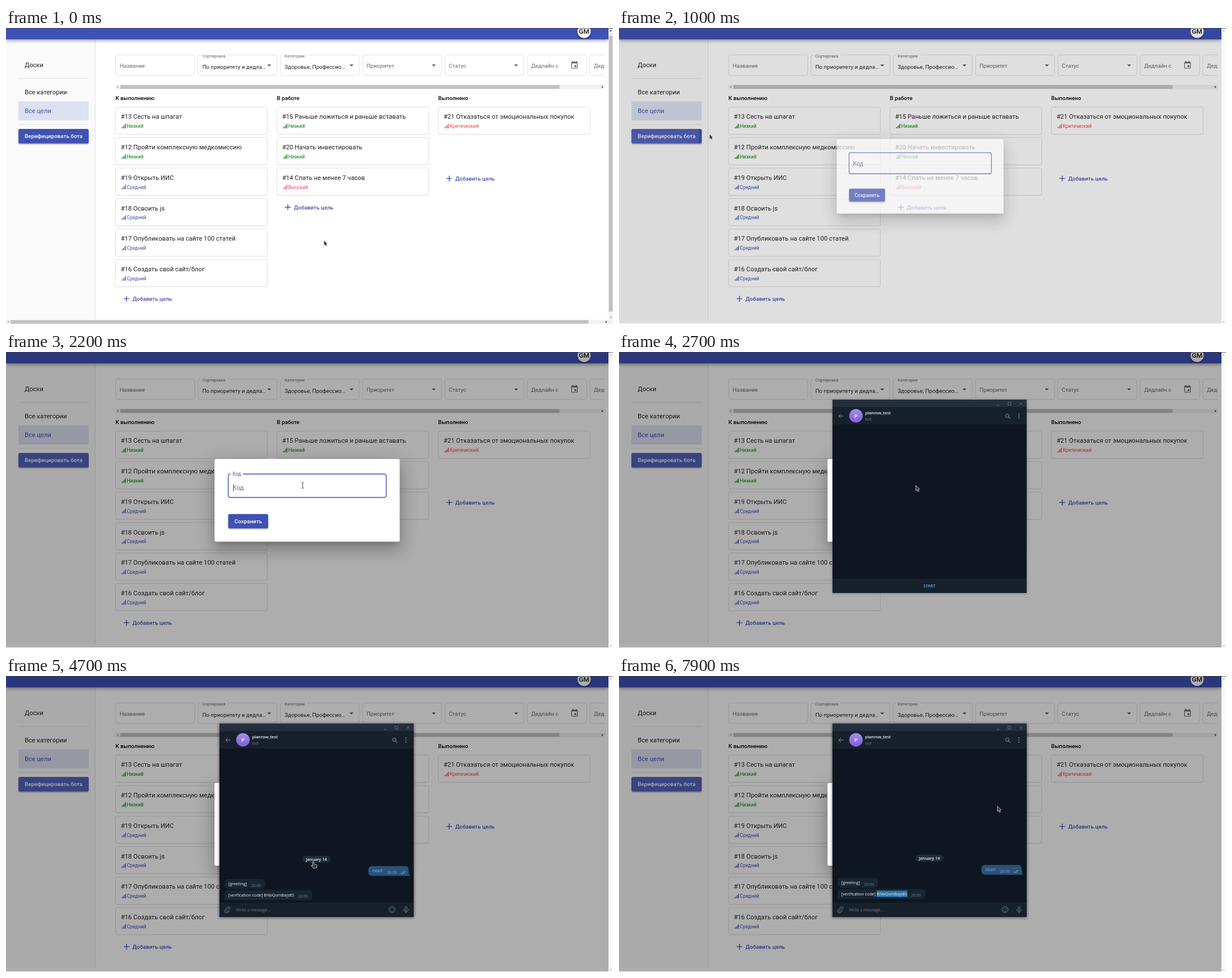
An HTML page for the animation above (8000 ms loop, 1072 px wide and 522 px high).

```html
<!DOCTYPE html>
<html lang="ru">
<head>
<meta charset="utf-8">
<title>Доска целей</title>
<style>
html, body { margin: 0; width: 100%; height: 100%; overflow: hidden; background: #fff; }
svg { display: block; width: 100vw; height: 100vh; }
text { font-family: Roboto, Arial, sans-serif; font-size: 9.77px; fill: #212121; white-space: pre; }
.md { font-weight: 500; }
.nav, .title { font-size: 11.17px; }
.tag { font-size: 8.38px; }
.hint { fill: #666; }
.small { font-size: 7.33px; fill: #666; }
.user { font-size: 11.8px; text-anchor: middle; }
.mid { text-anchor: middle; }
.chat text { font-family: "Open Sans", "Noto Sans", sans-serif; font-size: 7.26px; fill: #f0f3f6; }
.chat .semi { font-weight: 600; }
.chat .time { font-size: 6.7px; }
.chat .initial { font-size: 9px; text-anchor: middle; }
</style>
</head>
<body>
<svg id="stage" viewBox="0 0 1072 522" preserveAspectRatio="none"></svg>
<script>
const LOOP = 8000, STEP = 100;
const BLUE = '#3f51b5', GREEN = '#008000', PINK = '#ec407a', RED = '#f44336', LINE = '#e0e0e0';
const LEVELS = { low: ['Низкий', GREEN], mid: ['Средний', BLUE], high: ['Высокий', PINK], top: ['Критический', RED] };

const rect = (x, y, w, h, fill, more = '') =>
  `<rect x="${x}" y="${y}" width="${w}" height="${h}" fill="${fill}" ${more}/>`;
const text = (x, y, str, cls = '', fill = '', more = '') =>
  `<text x="${x}" y="${y}" class="${cls}" ${fill && `style="fill:${fill}"`} ${more}>${str}</text>`;
const path = (d, color, width = 1, more = '') =>
  `<path d="${d}" fill="none" stroke="${color}" stroke-width="${width}" ${more}/>`;
const solid = (d, fill, more = '') => `<path d="${d}" fill="${fill}" ${more}/>`;
const circle = (x, y, r, fill, more = '') => `<circle cx="${x}" cy="${y}" r="${r}" fill="${fill}" ${more}/>`;
const group = (id, body, more = '') => `<g id="${id}" ${more}>${body}</g>`;
const shadow = (x, y, w, h, dy, blur, spread, alpha) =>
  rect(x - spread, y - spread + dy, w + 2 * spread, h + 2 * spread, '#000',
    `rx="3" opacity="${alpha}" style="filter:blur(${blur / 2}px)"`);
const arrowHead = (x, y, dx, dy, fill) =>
  solid(`M${x + dx * 2} ${y + dy * 2}L${x - dx - dy * 2} ${y - dy - dx * 2}L${x - dx + dy * 2} ${y - dy + dx * 2}Z`, fill);

function card(x, y, title, level) {
  const [name, color] = LEVELS[level];
  const bars = [2.2, 4, 6, 8].map((h, i) => rect(x + 11 + i * 2.1, y + 37.4 - h, 1.15, h, color)).join('');
  return shadow(x, y, 268, 48, .7, 1.4, 0, .1) + rect(x, y, 268, 48, '#fff', `rx="3" stroke="${LINE}"`) +
    text(x + 9.2, y + 20.8, title, 'title') + bars + text(x + 20, y + 36.5, name, 'tag', color);
}

function column(x, name, cards, addY) {
  return text(x - .2, 126.8, name, 'md', '#000') +
    cards.map(([title, level], i) => card(x, 139.5 + i * 53.75, title, level)).join('') +
    path(`M${x + 14.2} ${addY}h10M${x + 19.2} ${addY - 5}v10`, BLUE, 1.4) +
    text(x + 30, addY + 3.6, 'Добавить цель', 'md', BLUE);
}

function field(i, label, { value, w = 139.5, arrow = true } = {}) {
  const x = 193.7 + i * 145.35;
  let out = rect(x, 47.5, w, 36, '#fff', `rx="3.5" stroke="${LINE}"`);
  if (value) {
    out += rect(x + 5, 46.5, label.length * 4.1 + 6, 2, '#fff') +
      text(x + 7.6, 51.6, label, 'small') + text(x + 7.6, 71.6, value);
  } else out += text(x + 7, 69.6, label, 'hint');
  if (arrow) out += solid(`M${x + 122.3} 64.3h7l-3.5 3.6z`, '#666');
  return out;
}

function page() {
  const calendar = rect(998.9, 60.2, 10.2, 10.8, 'none', 'rx="1" stroke="#666" stroke-width="1.2"') +
    rect(998.9, 60.2, 10.2, 2.2, '#666') + path('M1001 58v3M1007 58v3', '#666', 1.2) + rect(1004, 65.6, 3.2, 3.2, '#666');
  return rect(0, 0, 1072, 522, '#fff') + rect(0, 20, 157.5, 494.5, '#fafafa') + path('M157.5 20V514.5', LINE) +
    text(33, 69, 'Доски', 'nav') + text(33, 117, 'Все категории', 'nav') +
    path('M22 89H146M22 170.3H146', LINE) +
    rect(22, 129.5, 124, 33.5, '#dde0f0') + text(33, 150.4, 'Все цели', 'nav', BLUE) +
    shadow(22, 178, 124, 25.5, 1.6, 2.6, 0, .35) + rect(22, 178, 124, 25.5, BLUE, 'rx="2.8"') +
    `<clipPath id="btn"><rect x="22" y="178" width="124" height="25.5" rx="2.8"/></clipPath>` +
    circle(60, 190, 0, '#fff', 'id="ripple" clip-path="url(#btn)" opacity=".1"') +
    text(33, 194, 'Верифицировать бота', 'md', '#fff') +
    `<clipPath id="bar"><rect x="158" y="40" width="899" height="50"/></clipPath><g clip-path="url(#bar)">` +
    field(0, 'Название', { arrow: false }) +
    field(1, 'Сортировка', { value: 'По приоритету и дедла…' }) +
    field(2, 'Категории', { value: 'Здоровье, Профессио…' }) +
    field(3, 'Приоритет') + field(4, 'Статус') +
    field(5, 'Дедлайн с', { w: 105, arrow: false }) + calendar +
    field(5.762, 'Дедлайн по', { w: 105, arrow: false }) + '</g>' +
    rect(193.5, 100, 863.5, 8, '#f1f1f1') + rect(202, 100.7, 775.5, 6.6, '#c1c1c1') +
    arrowHead(197.5, 104, -1, 0, '#a3a3a3') + arrowHead(1053, 104, 1, 0, '#505050') +
    column(193.5, 'К выполнению', [['#13 Сесть на шпагат', 'low'], ['#12 Пройти комплексную медкомиссию', 'low'],
      ['#19 Открыть ИИС', 'mid'], ['#18 Освоить js', 'mid'],
      ['#17 Опубликовать на сайте 100 статей', 'mid'], ['#16 Создать свой сайт/блог', 'mid']], 477.4) +
    column(478.5, 'В работе', [['#15 Раньше ложиться и раньше вставать', 'low'],
      ['#20 Начать инвестировать', 'low'], ['#14 Спать не менее 7 часов', 'high']], 316) +
    column(763.5, 'Выполнено', [['#21 Отказаться от эмоциональных покупок', 'top']], 265.4) +
    shadow(0, 0, 1064, 20, 2, 6, 0, .4) + rect(0, 0, 1064, 20, BLUE) +
    shadow(1011, 0, 20, 16, 2, 4, 0, .3) + circle(1021, 6, 11.6, '#fff') +
    text(1021, 10.4, 'GM', 'user md', '#111');
}

function pageBars() {
  return rect(1064, 0, 8, 522, '#f1f1f1') + rect(0, 514.5, 1072, 7.5, '#f1f1f1') +
    rect(1064.7, 14, 6.6, 486, '#c1c1c1') + rect(8, 515.2, 1020.5, 6.2, '#c1c1c1') +
    arrowHead(1068, 5, 0, -1, '#505050') + arrowHead(1068, 510, 0, 1, '#a3a3a3') +
    arrowHead(4, 518.3, -1, 0, '#a3a3a3') + arrowHead(1060, 518.3, 1, 0, '#505050');
}

function dialog() {
  const [x, y, w, h] = [368.3, 188.5, 327, 146];
  return shadow(x, y, w, h, 7.7, 10.5, -4.9, .2) + shadow(x, y, w, h, 16.8, 26.6, 2, .14) +
    shadow(x, y, w, h, 6.3, 32, 5.6, .12) + rect(x, y, w, h, '#fff', 'rx="2.8"') +
    rect(392.5, 215.3, 279, 41.2, '#fff', `id="box" rx="3.5" stroke="${LINE}"`) +
    rect(396.5, 214, 22, 2.8, '#fff', 'id="notch"') +
    text(400.2, 243.2, 'Код', 'nav hint', '', 'id="ghost"') +
    group('label', text(0, 0, 'Код', 'nav', 'inherit')) +
    rect(401, 233, 1, 13, BLUE, 'id="caret"') +
    shadow(392.5, 285.7, 70.5, 25.3, 1.6, 2.6, 0, .35) + rect(392.5, 285.7, 70.5, 25.3, BLUE, 'rx="2.8"') +
    text(403.4, 301.8, 'Сохранить', 'md', '#fff');
}

function bubble(x, y, w, fill, body) {
  return rect(x, y, w, 17.4, fill, 'rx="6"') + body;
}

function chat() {
  const grey = '#6d7f8f', inFill = '#182533';
  return group('glow', shadow(377, 84, 343, 341, .5, 4, 1, .45)) +
    rect(377, 84, 343, 341, '#0e1621', 'rx="1.5"') + rect(377, 84, 343, 13.5, '#242f3d', 'rx="1.5"') +
    rect(377, 97.3, 343, 30.5, '#17212b') +
    path('M667 94h5M687 88.6h5v5h-5zM707.5 88.6l5 5M712.5 88.6l-5 5', grey, .8) +
    path('M396.3 113h-8.2m3.7-3.8l-3.8 3.8 3.8 3.8', '#8a98a5', 1) +
    `<linearGradient id="dot" x2="0" y2="1"><stop stop-color="#a98eea"/><stop offset="1" stop-color="#7b5fdc"/></linearGradient>` +
    circle(418.5, 112.6, 11.9, 'url(#dot)') +
    text(418.5, 115.9, 'P', 'semi initial', '#fff') +
    text(434.8, 110, 'planrow_test', 'semi') + text(434.8, 121.2, 'bot', '', grey) +
    circle(685.7, 112.2, 3, 'none', `stroke="${grey}" stroke-width="1.1"`) + path('M688 114.5l3.2 3.2', grey, 1.2) +
    [109.2, 112.9, 116.6].map(y => circle(706.3, y, .95, '#8a98a5')).join('') +
    `<clipPath id="view"><rect x="377" y="128" width="343" height="271.7"/></clipPath><g clip-path="url(#view)"><g id="feed">` +
    rect(523.2, 315, 50, 12.3, '#1e2c3a', 'rx="6.1"') + text(548.2, 323.8, 'January 14', 'semi mid') +
    bubble(640, 333.2, 71, '#2b5278', solid('M703 340h8q0 8 3 10.6h-9z', '#2b5278') +
      text(646.6, 344.4, '/start', '', '#7cbdf3') + text(672.8, 347, '20:09', 'time', '#7da8d3') +
      path('M697 345l2 2.1 4-5M700.7 346.4l.7.7 4.2-5', '#72bcf5', .9)) +
    group('greet', bubble(386, 356, 71.5, inFill, text(392.8, 367.2, '[greeting]') + text(433, 369.8, '20:09', 'time', grey))) +
    group('code', bubble(386, 375.6, 155, inFill, solid('M386 384q0 7-2.6 9h8z', inFill) +
      rect(455, 378.4, 54.3, 11.6, '#2e70a5', 'id="pick"') +
      text(392.8, 386.8, '[verification code]') + text(455.2, 386.8, 'BNbQomBajs8S') +
      text(516, 389.4, '20:09', 'time', grey))) + '</g></g>' +
    rect(377, 399.7, 343, 25.3, '#17212b') +
    group('startBar', text(548.2, 414.6, 'START', 'semi mid', '#5ea9e6')) +
    group('inputBar', path('M393.5 408.6l-5 5a1.5 1.5 0 0 0 2.1 2.1l4.3-4.4a2.6 2.6 0 0 0-3.7-3.7l-4.6 4.7a3.6 3.6 0 0 0 5 5l3.3-3.3', grey, .95) +
      text(406, 414.6, 'Write a message...', '', grey) +
      circle(681.8, 412, 5.3, 'none', `stroke="${grey}" stroke-width="1"`) +
      circle(679.9, 410.5, .8, grey) + circle(683.7, 410.5, .8, grey) + path('M679 413.6q2.8 3.2 5.6 0', grey, .9) +
      rect(704.9, 406.6, 3.2, 7, 'none', `rx="1.6" stroke="${grey}" stroke-width="1"`) +
      path('M702.3 411.5a4.2 4.2 0 0 0 8.4 0M706.5 415.8v2.4', grey, 1));
}

function pointers() {
  const edge = 'stroke="#e8e8e8" stroke-width=".8" stroke-linejoin="round"';
  const beam = 'M-2-5.2h1.4L0-4.6.6-5.2H2M0-4.6V4.6M-2 5.2h1.4L0 4.6.6 5.2H2';
  return group('arrow', solid('M.4.4V10.4L2.7 8.6 4.4 12 6.1 11.2 4.6 8 7.2 7.5Z', '#333', edge + ' transform="scale(.93)"')) +
    group('hand', solid('M2 .5q1.2-.6 1.5.8l.6 3.6 4 .8q1.4.4 1.1 2l-.7 3.6-5.2 1-4-4.4q.2-1.3 1.5-.8l1.3.7L1 1.8Q1 .8 2 .5z', '#333', edge)) +
    group('beam', path(beam, '#eee', 1.7) + path(beam, '#333', .8));
}

document.getElementById('stage').innerHTML = page() + group('bars', pageBars()) +
  group('locked', rect(1064, 0, 8, 522, '#f9f9f9') + arrowHead(1068, 5, 0, -1, '#c4c4c4') + arrowHead(1068, 518, 0, 1, '#c4c4c4')) +
  rect(0, 0, 1064, 521, '#000', 'id="scrim"') + group('dialog', dialog()) + group('chat', chat(), 'class="chat"') +
  rect(0, 0, 1072, .8, '#3a3f55') + group('pointer', pointers());

const el = {};
document.querySelectorAll('[id]').forEach(e => el[e.id] = e);
const set = (id, key, v) => el[id].setAttribute(key, v);
const show = (id, on) => set(id, 'visibility', on ? 'inherit' : 'hidden');
const span = (t, from, length) => Math.min(1, Math.max(0, (t - from) / length));

function bezier(x1, y1, x2, y2) {
  const at = (a, b, s) => 3 * (1 - s) * (1 - s) * s * a + 3 * (1 - s) * s * s * b + s * s * s;
  return x => {
    let lo = 0, hi = 1;
    for (let i = 0; i < 24; i++) {
      const mid = (lo + hi) / 2;
      if (at(x1, x2, mid) < x) lo = mid; else hi = mid;
    }
    return at(y1, y2, hi);
  };
}
const easeIn = bezier(0, 0, .2, 1), easeFade = bezier(.25, .8, .25, 1);
const easeOut = p => 1 - (1 - p) ** 3;

// Pointer route: time, x, y
const ROUTE = [[0, 561, 374], [200, 520, 345], [400, 320, 240], [600, 100, 162], [700, 62, 186], [900, 62, 187],
  [1000, 159.5, 186.5], [1100, 436.5, 220], [1300, 500, 238], [1600, 524, 235], [2700, 524, 235], [3000, 545, 251],
  [3100, 545, 251], [3400, 597, 335], [3700, 545, 412], [3800, 545, 412], [4000, 552, 275], [4200, 552, 266],
  [4400, 548, 259], [4500, 548, 259], [4700, 540, 327], [4900, 530, 372], [5400, 541, 387], [5700, 457, 383],
  [5900, 486, 382], [6500, 486, 382], [6900, 551, 373], [7100, 551, 373], [7300, 563, 381], [7500, 563, 381],
  [7800, 681, 232], [7900, 668, 229]];
const SHAPES = [[0, 'arrow'], [650, 'hand'], [950, 'arrow'], [1200, 'beam'], [2700, 'arrow'], [3600, 'hand'],
  [4000, 'arrow'], [4700, 'hand'], [4800, 'arrow'], [5600, 'beam'], [6600, 'arrow']];

function placePointer(t) {
  let i = ROUTE.findIndex(k => k[0] > t);
  if (i < 0) i = ROUTE.length;
  const a = ROUTE[i - 1], b = ROUTE[i] || a, p = span(t, a[0], b[0] - a[0] || 1);
  set('pointer', 'transform', `translate(${a[1] + (b[1] - a[1]) * p} ${a[2] + (b[2] - a[2]) * p})`);
  const shape = SHAPES.filter(s => s[0] <= t).pop()[1];
  ['arrow', 'hand', 'beam'].forEach(id => show(id, id === shape));
}

function draw(t) {
  const opened = 952, open = t >= opened;
  show('bars', !open);
  show('locked', open);
  set('ripple', 'r', 130 * span(t, 840, 256));
  set('scrim', 'opacity', .32 * easeFade(span(t, opened, 400)));

  const grow = easeIn(span(t, opened, 150)), size = .7 + .3 * grow;
  show('dialog', open);
  set('dialog', 'opacity', grow);
  set('dialog', 'transform', `translate(531.8 261.5) scale(${size}) translate(-531.8 -261.5)`);
  const focus = t >= 1100, rise = easeFade(span(t, 1100, 200));
  set('label', 'transform', `translate(400.2 ${240.6 - 22.5 * rise}) scale(${1 - .25 * rise})`);
  set('label', 'fill', rise ? BLUE : '#666');
  set('box', 'stroke', rise ? BLUE : LINE);
  set('box', 'stroke-width', rise ? 1.4 : 1);
  show('notch', focus);
  show('ghost', focus);
  show('caret', focus && (t < 1600 || t >= 2200));

  show('chat', t >= 2700);
  set('glow', 'opacity', .4 + .6 * span(t, 2700, 300));
  const sent = t >= 3900;
  show('feed', sent);
  show('startBar', !sent);
  show('inputBar', sent);
  show('greet', t >= 4200);
  show('code', t >= 4600);
  show('pick', t >= 6200);
  const shift = 64 - 22 * easeOut(span(t, 3860, 140)) - 22.6 * easeOut(span(t, 4160, 240)) - 19.4 * easeOut(span(t, 4560, 264));
  set('feed', 'transform', `translate(0 ${shift})`);
  placePointer(t);
}

const begin = performance.now();
function tick() {
  const t = (performance.now() - begin) % LOOP;
  draw(Math.floor(t / STEP) * STEP);
  requestAnimationFrame(tick);
}
tick();
</script>
</body>
</html>
```
